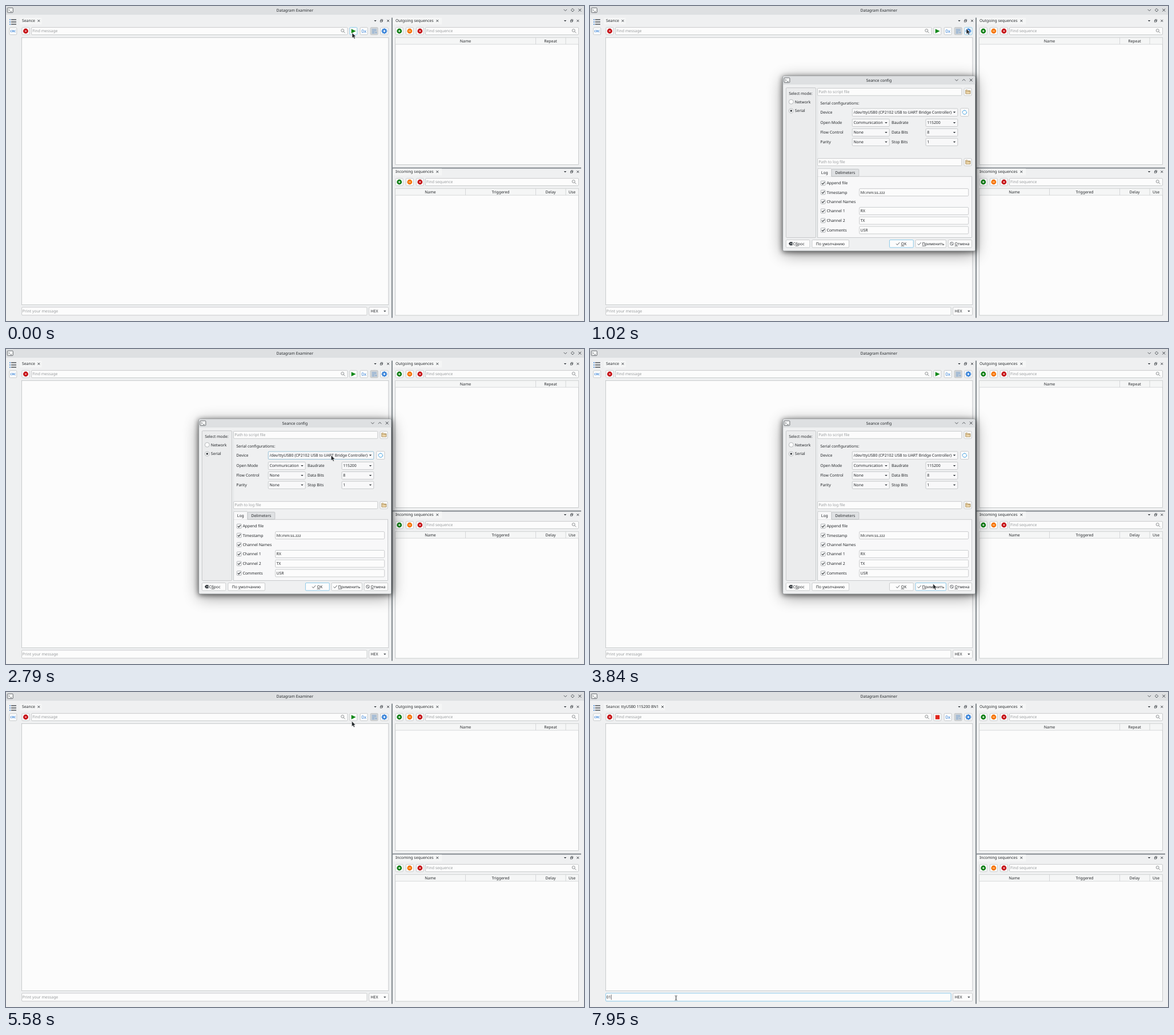
Write an HTML page that moves like this. It is 1012x553 px and loops after 8000 ms.

```html
<!DOCTYPE html>
<html lang="en">
<head>
<meta charset="utf-8">
<title>Datagram Examiner</title>
<style>
html, body { margin: 0; width: 100%; height: 100%; overflow: hidden; background: #eff0f1; }
svg { display: block; width: 1012px; height: 553px; }
text { font: 6.85px "Noto Sans", sans-serif; text-rendering: geometricPrecision; white-space: pre; fill: #232629; }
tspan { text-decoration: underline; text-decoration-thickness: .5px; }
.hint { fill: #989b9d; }
.blue { fill: #3581d8; }
</style>
</head>
<body>
<svg id="stage" viewBox="0 0 1012 553"></svg>
<script>
const INK = '#31363b', EDGE = '#b6b9bb', BLUE = '#3581d8', GLOW = '#5fb6e2', PAPER = '#fcfcfc';

// Drawing helpers: each returns SVG markup
const rect = (x, y, w, h, fill, stroke = 'none', more = '') =>
  `<rect x="${x}" y="${y}" width="${w}" height="${h}" fill="${fill}" stroke="${stroke}" stroke-width=".7" ${more}/>`;
const box = (x, y, w, h, fill = PAPER, more = '') => rect(x, y, w, h, fill, EDGE, 'rx="1.4" ' + more);
const path = (d, stroke = INK, width = .8, fill = 'none') =>
  `<path d="${d}" stroke="${stroke}" stroke-width="${width}" fill="${fill}"/>`;
const text = (x, y, s, more = '') => `<text x="${x}" y="${y}" ${more}>${s}</text>`;
const mid = (x, y, s, more = '') => text(x, y, s, 'text-anchor="middle" ' + more);
const hint = (x, y, s, more = '') => text(x, y, s, 'class="hint" ' + more);
const disc = (x, y, r, fill, stroke = 'none') =>
  `<circle cx="${x}" cy="${y}" r="${r}" fill="${fill}" stroke="${stroke}" stroke-width=".7"/>`;

const cross = (x, y, r = 2.1, c = INK, w = .9) => path(`M${x - r} ${y - r}l${2 * r} ${2 * r}m0 ${-2 * r}l${-2 * r} ${2 * r}`, c, w);
const arrow = (x, y) => path(`M${x - 2.2} ${y - 1.1}h4.4l-2.2 2.3z`, 'none', 0, INK);
const chevron = (x, y, d) => path(`M${x - 2.7} ${y - 1.3 * d}l2.7 ${2.7 * d}l2.7 ${-2.7 * d}`);
const lens = (x, y) => `<circle cx="${x - 1}" cy="${y - 1}" r="2.5" fill="none" stroke="#666a6d" stroke-width=".7"/>` +
  path(`M${x + .8} ${y + .8}l2.7 2.7`, '#666a6d');
const terminal = (x, y) => rect(x - 5, y - 4.2, 10, 8.4, '#f4f5f5', INK, 'rx="1.2"') +
  path(`M${x - 3.2} ${y - 2}l2 2l-2 2m3.2 .4h3`, INK, .7);
const button = (x, y, id = '') => box(x - 6.5, y - 6.4, 13, 12.8, PAPER, id && `id="${id}"`);
const badge = (x, y, fill, d) => button(x, y) + disc(x, y, 4.4, fill) + path(`M${x} ${y}` + d, '#fff', 1);
const RED = 'm-1.5 -1.5l3 3m0 -3l-3 3', MINUS = 'm-2 0h4', PLUS = MINUS + 'm-2 -2v4';
const dockTools = (x1, x2, x3, y) => arrow(x1, y) +
  rect(x2 - 1, y - 2.2, 3, 3, 'none', INK) + rect(x2 - 2.2, y - .7, 3, 2.7, '#eff0f1', INK) + cross(x3, y, 1.9);
const search = (x, y, w, s) => box(x, y - 6.4, w, 12.8) + hint(x + 1.6, y + 2.4, s) + lens(x + w - 7.8, y);

function dock(y, title, cuts, heads) {
  const h = y === 26 ? 223 : 222.5, top = y + 29.5;
  return rect(678, y - 5.5, 85, 12, '#f5f6f6') + text(682, y + 2.4, title) + cross(755.3, y, 1.9) +
    dockTools(979, 990.5, 1001.3, y) +
    badge(688.7, y + 18, '#0b7d12', PLUS) + badge(706.8, y + 18, '#f67400', MINUS) + badge(724.8, y + 18, '#c4040c', RED) +
    search(734.5, y + 18, 268, 'Find sequence') +
    rect(681.8, top, 320.6, h, PAPER, EDGE) + rect(682.2, top + .3, 320, 11.2, '#f5f6f6') +
    path(`M682 ${top + 11.7}h320` + cuts.map(x => `M${x} ${top}v11.5`).join(''), '#c9cbcc', .7) +
    heads.map(([x, s]) => mid(x, top + 8.3, s)).join('');
}

function gear(x, y) {
  let teeth = '';
  for (let i = 0; i < 8; i++) teeth += `<rect x="-1" y="-4.9" width="2" height="2.4" fill="${BLUE}" transform="rotate(${i * 45})"/>`;
  return `<g transform="translate(${x} ${y})">${teeth}<circle r="2.7" fill="none" stroke="${BLUE}" stroke-width="2"/></g>`;
}

const list = [24, 28, 32].map(y => rect(6.2, y - .8, 1.7, 1.7, BLUE) + path(`M9 ${y}h9`, INK, 1.3)).join('');

const mainWindow = rect(0, 0, 1012, 553, '#eff0f1') + rect(0, 0, 1012, 14.5, '#dee0e2') +
  path('M0 14.7H1012', '#cfd2d4', .6) + terminal(7.3, 7.4) + mid(505.8, 9.9, 'Datagram Examiner') +
  chevron(979.3, 7.2, 1) + path('M992 4.4l2.8 2.8l-2.8 2.8l-2.8 -2.8z') + cross(1004.7, 7.2, 2.4) +
  list + box(6, 38, 12.8, 12.4) + mid(12.4, 46.1, 'CRC', 'class="blue" style="font-size:5.2px;font-weight:600"') +
  rect(24.5, 20.5, 38, 12, '#f5f6f6') + rect(24.5, 20.5, 107, 12, '#f5f6f6', 'none', 'id="wideTab"') +
  text(28, 28.4, 'Seance', 'id="tab"') + `<g id="tabClose">${cross(0, 26, 1.9)}</g>` +
  dockTools(646.5, 657.5, 669, 26) +
  badge(34.5, 44, '#c4040c', RED) + search(44.6, 44, 553.4, 'Find message') +
  button(608.3, 44, 'playBtn') + path('M604.6 40.2l8 3.9l-8 3.9z', 'none', 0, '#12891b').replace('<path', '<path id="play"') +
  rect(604.7, 40.5, 7.4, 7.4, '#e0251b', 'none', 'id="stop"') +
  button(626.6, 44, 'hexBtn') + mid(626.6, 46.7, '0x', 'class="blue" style="font-size:7.9px"') +
  box(638.1, 37.6, 13, 12.8, '#d3d6d8', 'id="wrapBtn"') + path('M640.6 41h8M640.6 43.2h8M640.6 45.4h5M640.6 47.6h5m2.3 -3v3.2m-1.3 -1.2l1.3 1.3l1.3 -1.3', '#5b92d0', .8) +
  button(662.4, 44, 'gearBtn') + gear(662.4, 44) +
  rect(27.6, 55.5, 642.2, 469, PAPER, EDGE) +
  box(27.6, 528.8, 604.4, 14, PAPER, 'id="input"') + hint(28.8, 538.2, 'Print your message', 'id="prompt"') +
  text(28.8, 538.2, '', 'id="typed"') + rect(0, 531.3, .7, 9, INK, 'none', 'id="caret"') +
  box(635.6, 528.8, 34, 14) + text(638.5, 538.2, 'HEX') + arrow(663.3, 535.8) +
  path('M675.9 20.5V547.5', '#81888d', 2) + path('M677 284.4H1007', '#81888d', 2) +
  dock(26, 'Outgoing sequences', [927.5, 980], [[804.5, 'Name'], [953.5, 'Repeat']]) +
  dock(291, 'Incoming sequences', [804.5, 927.5, 980], [[743, 'Name'], [866, 'Triggered'], [953.5, 'Delay'], [991, 'Use']]);

// Dialog parts
const folder = y => button(661.5, y) + path(`M657.8 ${y + 3.3}v-6.6h3l1 1.2h4v5.4z`, '#8a6a33', .7, '#f3dcb0') + path(`M658 ${y - .6}h7.6`, '#8a6a33', .6);
const combo = (x, y, w, s, id = '') => box(x, y - 6.6, w, 13.2, '#f8f8f9', id && `id="${id}"`) + text(x + 2.2, y + 2.4, s) + arrow(x + w - 5.8, y);
const row = (y, a, av, b, bv) => text(403.3, y + 2.4, a) + combo(459.2, y, 65, av) + text(528, y + 2.4, b) + combo(588, y, 55.8, bv);
const radio = (y, s, on) => disc(352.2, y, 4, PAPER, '#9b9fa2') + (on ? disc(352.2, y, 1.8, INK) : '') + text(358.8, y + 2.4, s);
const check = (y, s, v) => rect(404.3, y - 3.8, 7.6, 7.6, PAPER, '#8f9498', 'rx="1"') + path(`M405.9 ${y}l1.7 1.8l3 -3.7`, INK, 1.1) +
  text(414.4, y + 2.4, s) + (v ? box(471.6, y - 6.5, 191, 13) + text(473.4, y + 2.4, v) : '');
const push = (x, w, tx, s, id = '') => box(x, 410.6, w, 13.4, PAPER, id && `id="${id}"`) + text(tx, 419.8, s);
const tick = x => path(`M${x - 3} 417.3l2 2.2l4 -4.4`, INK, .8);

const dialog = `<g id="dialog">` +
  rect(338, 123.5, 336.5, 306.5, '#000', 'none', 'filter="url(#far)" opacity=".42" transform="translate(0 5)"') +
  rect(337, 123, 338.5, 308, '#000', 'none', 'filter="url(#near)" opacity=".6" transform="translate(0 1)"') +
  rect(337.6, 123, 337, 307, '#eff0f1', '#8c9194', 'rx="2"') +
  path('M338 137V125q0 -1.7 1.7 -1.7H672.6q1.7 0 1.7 1.7V137z', 'none', 0, '#dee0e2') + path('M338 137.2H674.3', '#cfd2d4', .6) +
  terminal(344.8, 130.2) + mid(505.9, 132.6, 'Seance config') + chevron(641.9, 130, 1) + chevron(654.6, 130, -1) + cross(667.2, 130, 2.4) +
  box(343.3, 143.6, 52.2, 263, '#ebeced') + text(348.2, 156.3, 'Select mode:') + radio(168.2, 'Network') + radio(184, 'Serial', true) +
  path('M398.3 143.6V406.6', '#d5d7d8', .6) +
  box(398.5, 144.4, 252.3, 12.8) + hint(400.2, 153.2, 'Path to script file') + folder(150.8) +
  text(403.3, 172.7, 'Serial configurations:') + text(403.3, 189.1, 'Device') +
  box(459.2, 180, 184.6, 13.6, '#f8f8f9', 'id="device"') +
  text(461.4, 189.1, '/dev/ttyUSB0 (CP2102 USB to UART Bridge Controller)', 'clip-path="url(#clip)"') + arrow(638, 186.7) +
  box(648.8, 179.6, 14, 14) + path('M652.2 187.6a3.6 3.6 0 0 1 6 -3.5l.8 1M659.4 185.6a3.6 3.6 0 0 1 -6 3.6l-.8 -1', '#3d9ee0', 1) +
  row(205, 'Open Mode', 'Communication', 'Baudrate', '115200') +
  row(222, 'Flow Control', 'None', 'Data Bits', '8') + row(238.8, 'Parity', 'None', 'Stop Bits', '1') +
  box(398.5, 267.7, 252.3, 12.8) + hint(400.2, 276.4, 'Path to log file') + folder(274.1) +
  rect(398.6, 299.2, 270, 107.3, '#f8f8f9', EDGE) + box(422.8, 286.3, 48, 12.8, '#dfe1e3') +
  path('M398.6 299.6V286.6q0 -1.4 1.4 -1.4H421.4q1.4 0 1.4 1.4V299.6', EDGE, .7, '#f8f8f9') +
  text(404.8, 294.8, 'Log') + text(429.2, 294.8, 'Delimeters') +
  check(311, 'Append file') + check(327.1, 'Timestamp', 'hh:mm:ss.zzz') + check(343.5, 'Channel Names') +
  check(359.9, 'Channel 1', 'RX') + check(376.7, 'Channel 2', 'TX') + check(393.5, 'Comments', 'USR') +
  push(343.2, 41.6, 355.4, 'С<tspan>б</tspan>рос') + path('M347.8 417.3l2.3 -3h4.4v6h-4.4z', 'none', 0, INK) + cross(352, 417.3, 1.1, '#fff', .7) +
  push(388.8, 64.6, 395.8, 'По <tspan>у</tspan>молчанию') +
  push(524.4, 41.8, 544.6, '<tspan>O</tspan>K', 'ok') + tick(539) +
  push(570, 53.4, 581.6, '<tspan>П</tspan>рименить', 'apply') + tick(576.6) +
  push(627.2, 41.3, 638.6, '<tspan>О</tspan>тмена') + disc(633.4, 417.3, 2.8, 'none', INK) + path('M631.5 415.4l3.8 3.8', INK, .7) +
  `<g id="popup">${rect(459.2, 193.8, 184.6, 14.8, PAPER, '#a9acae')}${text(464.5, 203.6, '/dev/ttyS0')}</g></g>`;

const pointers = '<g id="arrow">' + path('M0 0V9.2L2.1 7.4L3.7 10.6L5.3 9.8L3.8 6.8L6.5 6.4z', '#fff', .5, '#24282b') + '</g>' +
  '<g id="beam">' + path('M-2 -4q2 0 2 1v6q0 1 -2 1M2 -4q-2 0 -2 1v6q0 1 2 1', INK, .8) + '</g>';

document.getElementById('stage').innerHTML = `<defs>
  <filter id="far" x="-30%" y="-30%" width="160%" height="160%"><feGaussianBlur stdDeviation="14"/></filter>
  <filter id="near" x="-20%" y="-20%" width="140%" height="140%"><feGaussianBlur stdDeviation="5"/></filter>
  <clipPath id="clip"><rect x="460" y="178" width="173.3" height="18"/></clipPath></defs>` + mainWindow + dialog + pointers;

const $ = Object.fromEntries([...document.querySelectorAll('#stage [id]')].map(e => [e.id, e]));
const set = (e, name, value) => e.setAttribute(name, value);
const show = (e, on) => { e.style.display = on ? '' : 'none'; };
const ramp = (t, from, to) => Math.min(1, Math.max(0, (t - from) / (to - from)));

// Pointer stops: time, x, y
const STOPS = [[0, 606, 47], [200, 606, 47], [540, 659, 40], [1020, 659, 40], [1530, 569, 185.3], [2760, 569, 185.3],
  [3450, 600.6, 412.3], [3960, 600.6, 412.3], [4380, 558, 417.3], [4920, 558, 417.3], [5580, 605.4, 51.3],
  [5700, 607, 46.5], [6360, 607, 46.5], [7170, 150.6, 537.2], [8000, 150.6, 537.2]];

function pointerAt(t) {
  const i = STOPS.findIndex(s => s[0] > t), a = STOPS[i - 1], b = STOPS[i];
  const u = ramp(t, a[0], b[0]), k = u * u * (3 - 2 * u);
  return [a[1] + (b[1] - a[1]) * k, a[2] + (b[2] - a[2]) * k];
}

function draw(t) {
  const [x, y] = pointerAt(t);
  const over = (l, r, top, bottom) => x > l && x < r && y > top && y < bottom;
  const inInput = over(27, 632, 528, 543);
  show($.arrow, !inInput);
  show($.beam, inInput);
  for (const p of [$.arrow, $.beam]) set(p, 'transform', `translate(${x} ${y})`);
  [['playBtn', 608.3], ['hexBtn', 626.6], ['wrapBtn', 644.6], ['gearBtn', 662.4]].forEach(([id, cx]) =>
    set($[id], 'stroke', over(cx - 6.5, cx + 6.5, 37.5, 50.5) ? GLOW : EDGE));

  const open = ramp(t, 832, 992) * (1 - ramp(t, 4706, 4866)), scale = .8 + .2 * open;
  show($.dialog, open > 0);
  set($.dialog, 'opacity', open);
  set($.dialog, 'transform', `translate(506 276.5) scale(${scale}) translate(-506 -276.5)`);
  const pressed = t >= 1800 && t < 2640;
  set($.device, 'fill', pressed ? '#a9c8da' : '#f8f8f9');
  set($.device, 'stroke', pressed || t > 1470 && t < 2880 ? '#6fa9c8' : EDGE);
  const drop = ramp(t, 1830, 1960) * (1 - ramp(t, 2600, 2730));
  show($.popup, drop > 0);
  set($.popup, 'opacity', drop);
  const onApply = t >= 3420 && t < 4320;
  set($.ok, 'stroke', onApply ? EDGE : GLOW);
  set($.apply, 'stroke', onApply ? GLOW : EDGE);

  const live = t >= 5940;
  show($.play, !live);
  show($.stop, live);
  show($.wideTab, live);
  $.tab.textContent = live ? 'Seance: ttyUSB0 115200 8N1' : 'Seance';
  set($.tabClose, 'transform', `translate(${live ? 127 : 57.4} 0)`);

  const typed = '01'.slice(0, t < 7770 ? 0 : t < 7900 ? 1 : 2);
  $.typed.textContent = typed;
  show($.prompt, !typed);
  show($.caret, t >= 7410);
  set($.caret, 'x', 29 + typed.length * 3.92);
  set($.input, 'stroke', inInput ? GLOW : EDGE);
}

const start = performance.now();
function tickFrame() {
  draw((performance.now() - start) % 8000);
  requestAnimationFrame(tickFrame);
}
tickFrame();
</script>
</body>
</html>
```
